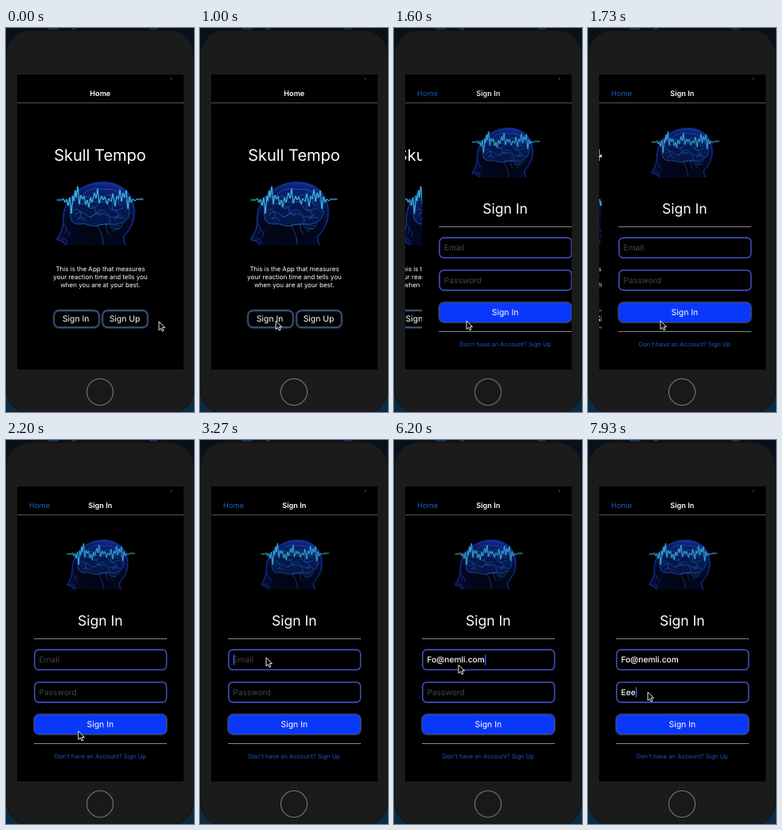
Recreate the animation shown at these times as an HTML page. Size 236 by 480 pixels, loop 8000 ms.

```html
<!DOCTYPE html>
<html lang="en">
<head>
<meta charset="utf-8">
<title>Reaction app sign in</title>
<style>
  html, body { margin: 0; width: 100%; height: 100%; overflow: hidden; background: #08101a; }
  svg { display: block; width: 236px; height: 480px; }
  text { font-family: Inter, Roboto, sans-serif; fill: #fff; text-rendering: geometricPrecision; white-space: pre; }
  .mid text, text.mid { text-anchor: middle; }
  .name { font-size: 20px; }
  .about { font-size: 8px; }
  .label { font-size: 10.4px; }
  .bar { font-size: 9.1px; font-weight: 600; }
  .back { font-size: 9.3px; fill: #1a5cc6; }
  .heading { font-size: 17.5px; }
  .link { font-size: 7.55px; fill: #1a57bf; }
  .typed { font-size: 10.2px; font-weight: 500; }
  .hint { font-size: 10.2px; fill: #454545; }
  .rule { stroke: #858585; stroke-width: 1; }
  .outline { fill: #000; stroke: #33588f; stroke-width: 1.3; filter: drop-shadow(.4px .5px .9px #8087a6); }
  .field { fill: #000; stroke: #444fc4; stroke-width: 1.4; filter: drop-shadow(0 0 .6px #343d80); }
  .submit { fill: #0a38fb; filter: drop-shadow(.4px .6px 1px #c4c2bc); }
  .caret { fill: #405ff2; }
</style>
</head>
<body>
<svg viewBox="0 0 236 480">
  <defs>
    <clipPath id="screen"><rect x="14" y="58" width="209" height="369"/></clipPath>
    <clipPath id="imageBox"><rect width="118" height="83.5"/></clipPath>
    <linearGradient id="desk" x2="0" y2="1">
      <stop offset="0" stop-color="#07111c"/>
      <stop offset="1" stop-color="#0c2b42"/>
    </linearGradient>
    <radialGradient id="skull" cx=".52" cy=".72" r=".76">
      <stop offset="0" stop-color="#02040f"/>
      <stop offset=".55" stop-color="#030822"/>
      <stop offset=".8" stop-color="#081a60"/>
      <stop offset="1" stop-color="#1434a8"/>
    </radialGradient>
    <g id="brain" clip-path="url(#imageBox)" fill="none" stroke-linecap="round" stroke-linejoin="round">
      <path fill="url(#skull)" stroke="#1a3fb4" stroke-width=".9" style="filter:drop-shadow(0 0 1.2px #10288c)"
        d="M17 85L13 81L11 78L4 76.5Q4 75 7 71Q12 64 12 53C11 24 36 5 62 5C86 5 101 21 101 42C101 57 93 66 88 72Q86 77 91 85Z"/>
      <path fill="#0a2a78" fill-opacity=".5" stroke="#235cc4" stroke-width=".8"
        d="M22 52C17 38 25 25 36 21C44 11 57 12 64 14C75 11 88 20 91 30C98 39 95 52 86 55C76 60 67 55 59 58C48 63 41 55 34 57Q25 58 22 52"/>
      <g stroke="#2d6fd6" stroke-width=".7" opacity=".8">
        <path d="M26 46Q33 38 40 45T54 42Q62 36 67 44T84 46M31 34Q38 28 43 35T57 31Q65 26 69 35T87 37"/>
        <path d="M38 24Q46 19 49 27T63 22Q71 17 77 27M46 49C51 41 66 42 70 50C74 56 65 60 57 57"/>
        <path d="M25 40Q30 36 33 42T30 51Q36 47 40 53M47 36Q52 34 52 40T60 46M74 30Q71 38 78 41T76 51Q83 47 89 50M82 27Q79 34 86 33"/>
        <path d="M55 57C55 65 62 67 62 83M66 57Q65 66 70 70M72 56C74 68 85 65 87 56M75 59L84 59M76 62L82 62M69 58L77 68"/>
      </g>
      <path stroke="#1c3fb0" stroke-width="1" opacity=".75" d="M12 57Q18 61 14 69M16 64Q22 67 18 73M11 75Q17 75 16 81"/>
      <path stroke="#4cc4e6" stroke-width=".95" style="filter:drop-shadow(0 0 1.2px #1677b8)"
        d="M4 27H10L12 25L14 30L16 26L18 34L20 24L22 44L24 22L25 28L27 15L28 24L30 10L32 32L34 21L36 26L38 22L40 33L42 27L44 36L46 24L48 30L51 18L53 25L55 13L57 31L60 22L62 27L64 23L67 32L69 25L72 29L74 19L77 35L79 22L81 26L83 14L85 29L87 18L89 24L91 15L93 38L95 23L97 30L99 26L102 28L104 26H112"/>
    </g>
  </defs>

  <rect width="236" height="480" fill="url(#desk)"/>
  <path d="M52 1H66M82 1H88M180 1H190" stroke="#27506f" stroke-width="1"/>
  <rect x=".5" y="3" width="235" height="479" rx="30" fill="#1b1b1b" stroke="#111"/>
  <circle cx="118" cy="455" r="16.5" fill="#191919" stroke="#777" stroke-width="1.1"/>

  <g clip-path="url(#screen)">
    <rect x="14" y="58" width="209" height="369"/>
    <g id="home" class="mid">
      <text class="name" x="118" y="165.5">Skull Tempo</text>
      <use href="#brain" x="60" y="188"/>
      <g class="about">
        <text x="118.5" y="304.3">This is the App that measures</text>
        <text x="118.5" y="314.3">your reaction time and tells you</text>
        <text x="118.5" y="324.3">when you are at your best.</text>
      </g>
      <rect class="outline" x="60.5" y="353.5" width="56" height="20.5" rx="6"/>
      <rect class="outline" x="121.5" y="353.5" width="56" height="20.5" rx="6"/>
      <text class="label" x="87.7" y="367.4">Sign In</text>
      <text class="label" x="149" y="367.4">Sign Up</text>
    </g>

    <g id="login">
      <rect x="14" y="58" width="209" height="369"/>
      <use id="image" href="#brain" transform="translate(74 121.5) scale(.78)"/>
      <path class="rule" d="M35 248.5H202"/>
      <text class="heading mid" x="118.3" y="232">Sign In</text>
      <rect class="field" x="36" y="262.3" width="165.5" height="25" rx="5"/>
      <rect class="field" x="36" y="302.8" width="165.5" height="25" rx="5"/>
      <text class="hint" id="mailHint" x="41.5" y="278.4">Email</text>
      <text class="hint" id="passHint" x="41.5" y="318.9">Password</text>
      <text class="typed" id="mail" x="41.5" y="278.4"></text>
      <text class="typed" id="pass" x="41.5" y="318.9"></text>
      <rect class="caret" id="caret" width="1.3" height="13"/>
      <rect class="submit" x="35.5" y="343.3" width="166" height="24.5" rx="6"/>
      <text class="label mid" x="118.3" y="359.4">Sign In</text>
      <path class="rule" d="M35 379.5H202"/>
      <text class="link mid" x="118.3" y="397.8">Don't have an Account? Sign Up</text>
    </g>

    <rect x="14" y="58" width="209" height="35.5"/>
    <path d="M14 93.7H223" stroke="#666" stroke-width=".9"/>
    <path d="M207.5 62V65.5" stroke="#555" stroke-width=".8"/>
    <text class="bar mid" id="homeBar" x="118.3" y="84.8">Home</text>
    <text class="bar mid" id="loginBar" x="118.3" y="84.8">Sign In</text>
    <text class="back" id="back" x="29" y="84.6">Home</text>
  </g>

  <path id="pointer" d="M0 0V10.6L2.5 8.3L4.1 12L5.9 11.2L4.3 7.6H7.5Z" fill="#000" stroke="#fff" stroke-width=".9" stroke-linejoin="round"/>
</svg>

<script>
const LOOP = 8000, WIDTH = 209;
const $ = id => document.getElementById(id);

// Pointer stops: time, x, y
const stops = [
  [70, 192, 367], [400, 164, 366], [600, 164, 366], [1070, 91, 366],
  [2130, 91, 366], [2930, 83, 272], [6130, 83, 272], [6200, 81, 281], [6850, 75, 315]
];
const mailText = "Fo@nemli.com";
const mailKeys = [3930, 4070, 4200, 4470, 4600, 4870, 5130, 5330, 5530, 5670, 5800, 5800];
const passText = "Eee";
const passKeys = [7330, 7530, 7930];
const mailFocus = 3070, passFocus = 7130, slideStart = 1385, imageReady = 1500;

const smooth = p => p * p * (3 - 2 * p);
const spring = s => s <= 0 ? 0 : 1 - (1 + 17.9 * s) * Math.exp(-17.9 * s);
const typed = (text, keys, t) => text.slice(0, keys.filter(k => k <= t).length);
const move = (el, x, y = 0) => el.setAttribute("transform", `translate(${x} ${y})`);
const show = (el, on) => el.setAttribute("visibility", on ? "inherit" : "hidden");

function pointerAt(t) {
  const i = stops.findIndex(s => s[0] > t);
  if (i === 0) return stops[0].slice(1);
  if (i < 0) return stops[stops.length - 1].slice(1);
  const [t0, x0, y0] = stops[i - 1], [t1, x1, y1] = stops[i];
  const p = smooth((t - t0) / (t1 - t0));
  return [x0 + (x1 - x0) * p, y0 + (y1 - y0) * p];
}

function setField(id, value) {
  $(id).textContent = value;
  show($(id + "Hint"), !value);
}

function render(t) {
  const p = spring((t - slideStart) / 1000);
  move($("home"), -0.3 * WIDTH * p);
  move($("login"), WIDTH * (1 - p));
  show($("image"), t >= imageReady);
  $("homeBar").setAttribute("opacity", Math.max(0, 1 - 1.7 * p));
  $("loginBar").setAttribute("opacity", p);
  $("back").setAttribute("opacity", p);

  setField("mail", typed(mailText, mailKeys, t));
  setField("pass", typed(passText, passKeys, t));
  const active = t < passFocus ? $("mail") : $("pass");
  const length = active.textContent ? active.getComputedTextLength() : 0;
  move($("caret"), 41.8 + length, t < passFocus ? 268.3 : 308.8);
  show($("caret"), t >= mailFocus);

  move($("pointer"), ...pointerAt(t));
}

const start = performance.now();
function tick() {
  render((performance.now() - start) % LOOP);
  requestAnimationFrame(tick);
}
tick();
</script>
</body>
</html>
```
